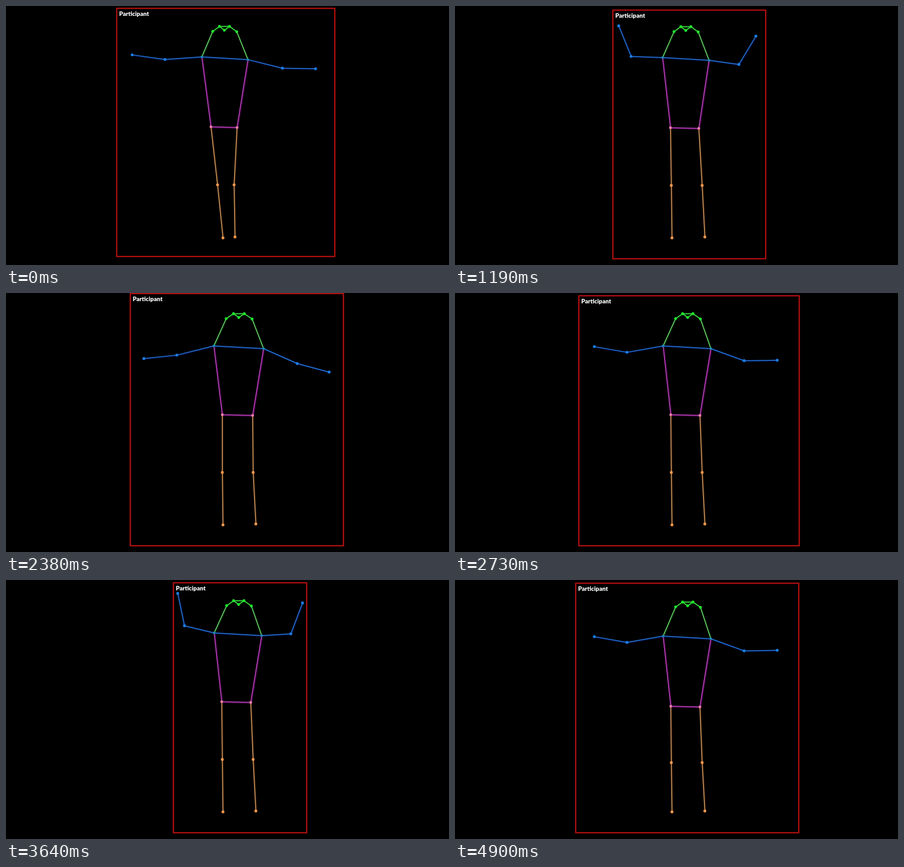
Write an HTML page with a canvas that moves like this. It is 977 px wide and 573 px high and loops after 4.97 s.

```html
<!DOCTYPE html>
<html lang="en">
<head>
<meta charset="utf-8">
<title>Pose tracking</title>
<style>
  html, body { margin: 0; width: 100%; height: 100%; overflow: hidden; background: #000; }
  canvas { display: block; }
</style>
</head>
<body>
<canvas id="stage" width="977" height="573"></canvas>
<script>
const ctx = document.getElementById('stage').getContext('2d');
const LOOP = 4970, STEP = 70;
const HELD_STEPS = [1750, 2170, 3220, 4270];
const FOREARM = 73;

// Key poses of the flap: time, upper arm and forearm angle (degrees above level),
// left and right side of the box.
const flap = [
  [0, -4, 8, 243.5, 724.5],
  [270, -11, -5, 246, 718],
  [490, -8, 0, 241, 719],
  [800, -10, 10, 241, 728],
  [1100, -9, 43, 274, 727],
  [1190, 2, 68, 348, 685],
  [1450, 14, 80, 374, 656],
  [2100, -1, 30, 289, 754],
  [2380, -14, -6, 274, 744],
  [2750, -10, 10, 273, 759],
  [3150, -9, 43, 301, 728],
  [3570, 14, 80, 372, 660],
  [4200, -1, 30, 289, 751],
  [4480, -13, -6, 273, 748],
  [4830, -10, 8, 266, 766],
  [4900, -10, 10, 266, 758]
];

const ease = u => u * u * (3 - 2 * u);
const ramp = (t, start, end) => ease(Math.min(1, Math.max(0, (t - start) / (end - start))));
const mix = (a, b, u) => a + (b - a) * u;

function flapAt(t) {
  const next = flap.findIndex(key => key[0] > t);
  if (next < 0) return flap[flap.length - 1].slice(1);
  const a = flap[next - 1], b = flap[next];
  const u = ramp(t, a[0], b[0]);
  return a.map((value, i) => mix(value, b[i], u)).slice(1);
}

// A point at the given length and angle; side is -1 for left, 1 for right.
function reach([x, y], side, length, degrees) {
  const angle = degrees * Math.PI / 180;
  return [x + side * length * Math.cos(angle), y - length * Math.sin(angle)];
}

function poseAt(t) {
  const [upper, fore, left, right] = flapAt(t);
  const stance = ramp(t, 490, 1190);
  const settle = ramp(t, 1190, 2380);
  const sink = 10 * ramp(t, 4400, 4900) - 2 * (1 - stance);

  // The torso turns most while the arms pass the half-raised position.
  const turn = Math.sin(2 * fore * Math.PI / 180);
  const half = 52 + 2 * stance - 4 * turn;
  const hipX = 482 + 27.5 * stance - 4.5 * turn;
  const lean = 4 * turn + 4 * settle;
  const chestX = hipX + 1.5 + 0.4 * lean, headX = hipX + lean;
  const chestY = 117 + 3 * settle + 0.7 * sink, hipY = 270 + sink;
  const headY = 45.7 + 0.3 * sink, kneeY = 397 + 0.7 * sink;

  const p = { nose: [headX - 0.3, headY + 8.4] };
  for (const [name, side] of [['L', -1], ['R', 1]]) {
    const isRight = side > 0;
    p['eye' + name] = [headX + side * 0.218 * half, headY];
    p['ear' + name] = [headX + 0.5 + side * 0.52 * half, headY + 11.3 + side * 0.4];
    p['hip' + name] = [hipX + side * half * mix(0.565, 0.61, stance), hipY + side * 0.8];
    p['knee' + name] = [isRight ? mix(503, 545, stance) : mix(466.5, 477, stance), kneeY];
    p['ankle' + name] = [isRight ? mix(505, 551, stance) : 478.5, 512 - side];

    const shoulder = [chestX + side * half, chestY + side * 3];
    const elbow = reach(shoulder, side, 83 - 0.2 * fore - (isRight ? 3 : 0), upper - (isRight ? 10 : 0));
    p['shoulder' + name] = shoulder;
    p['elbow' + name] = elbow;
    p['wrist' + name] = reach(elbow, side, FOREARM, fore - (isRight ? 9 : 0));
  }
  const top = 3 + 8 * turn + 0.15 * sink, bottom = 554 + 4.5 * stance;
  p.box = [left, top, right, bottom].map(Math.round);
  return p;
}

const limbs = [
  { line: '#cc9662', glow: '#4a2400', chains: ['hipL kneeL ankleL', 'hipR kneeR ankleR'] },
  { line: '#b844ba', glow: '#640068', chains: ['shoulderL hipL hipR shoulderR'] },
  { line: '#6ad06a', glow: '#003c00', chains: ['earL shoulderL', 'earR shoulderR'] },
  { line: '#40de46', glow: '#004400', chains: ['earL eyeL eyeR earR', 'eyeL nose eyeR'] },
  { line: '#2672d0', glow: '#001868', chains: ['wristL elbowL shoulderL shoulderR elbowR wristR'] }
];
const dots = [
  ['#1ee62c', 3.1, 'earL eyeL nose eyeR earR'],
  ['#1c88b0', 2.7, 'shoulderL shoulderR'],
  ['#1a7ae0', 3.2, 'elbowL wristL elbowR wristR'],
  ['#ea7ca8', 3, 'hipL hipR'],
  ['#ee944c', 3.2, 'kneeL ankleL kneeR ankleR']
];

function trace(points, color, width, dx = 0, dy = 0) {
  ctx.beginPath();
  points.forEach(([x, y]) => ctx.lineTo(x + dx, y + dy));
  ctx.strokeStyle = color;
  ctx.lineWidth = width;
  ctx.stroke();
}

function drawBox([left, top, right, bottom]) {
  for (const [color, width, shift] of [['#400000', 4, 0.5], ['#c01414', 2, 0]]) {
    ctx.strokeStyle = color;
    ctx.lineWidth = width;
    ctx.strokeRect(left + shift, top + shift, right - left, bottom - top);
  }
  ctx.fillStyle = '#fff';
  ctx.font = '900 13.2px Lato, sans-serif';
  ctx.fillText('Participant', left + 5.5, top + 17);
}

function draw(t) {
  const p = poseAt(t);
  const points = names => names.split(' ').map(name => p[name]);
  ctx.fillStyle = '#000';
  ctx.fillRect(0, 0, 977, 573);
  ctx.lineJoin = 'round';
  drawBox(p.box);
  ctx.globalAlpha = 0.6;
  for (const { glow, chains } of limbs) {
    chains.forEach(chain => trace(points(chain), glow, 4, 1.2, 1));
  }
  ctx.globalAlpha = 1;
  for (const { line, chains } of limbs) {
    chains.forEach(chain => trace(points(chain), line, 2));
  }
  for (const [color, radius, names] of dots) {
    ctx.fillStyle = color;
    for (const [x, y] of points(names)) {
      ctx.beginPath();
      ctx.arc(x, y, radius, 0, 2 * Math.PI);
      ctx.fill();
    }
  }
}

function tick() {
  let t = Math.floor((performance.now() % LOOP) / STEP) * STEP;
  if (HELD_STEPS.includes(t)) t -= STEP;
  draw(t);
  requestAnimationFrame(tick);
}
tick();
</script>
</body>
</html>
```
